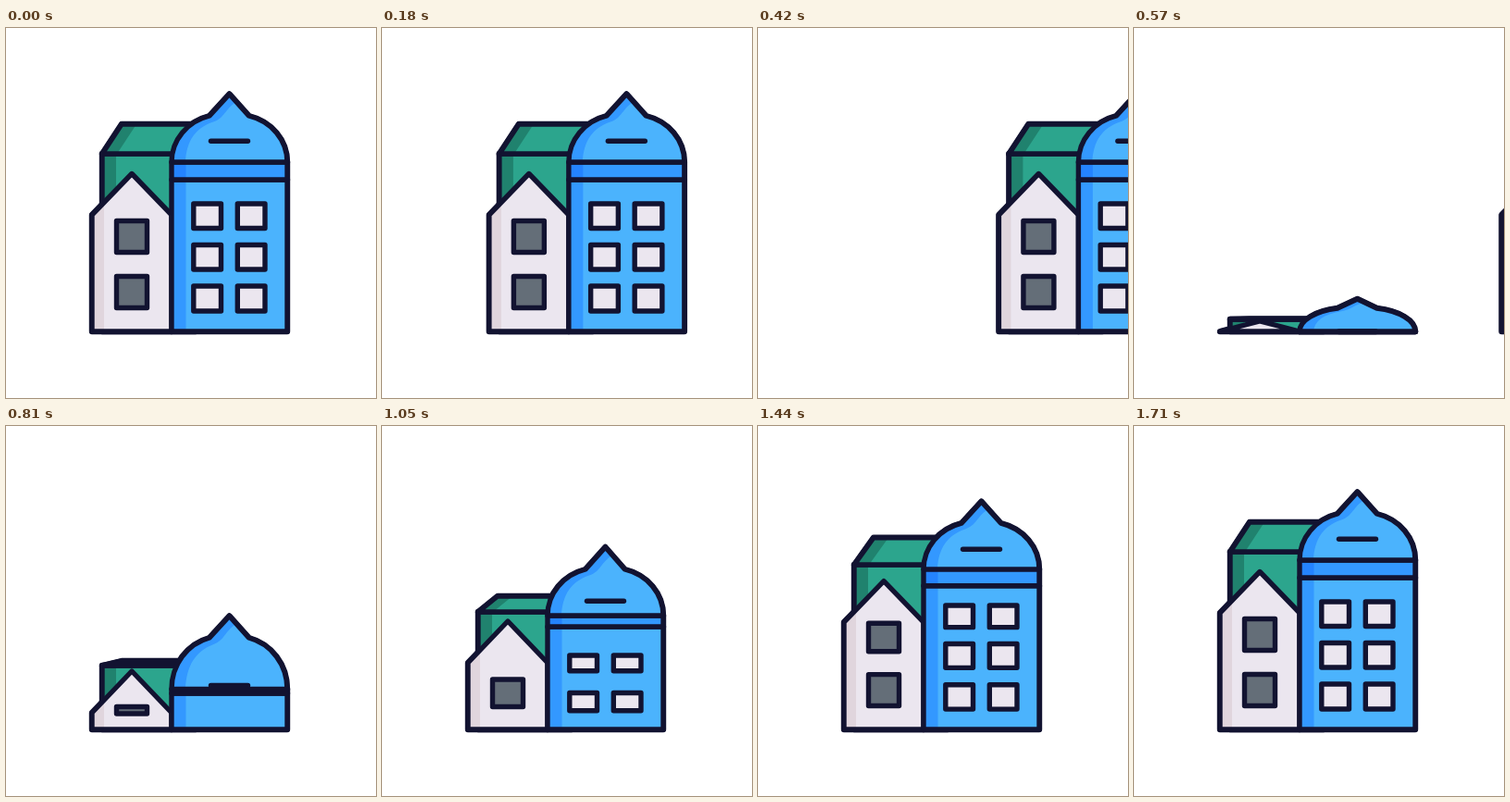
These frames come from a looping animation (400 px wide and 400 px high, 3.74 s). An HTML page with a canvas:

```html
<!DOCTYPE html>
<html lang="en">
<head>
<meta charset="utf-8">
<title>Houses</title>
<style>
  html, body { margin: 0; width: 100%; height: 100%; overflow: hidden; background: #fff; }
  canvas { display: block; width: 100vmin; height: 100vmin; }
</style>
</head>
<body>
<canvas id="stage"></canvas>
<script>
const LOOP = 3740, STEP = 30, GROUND = 328, RISE = 480, END = 1710;
const INK = '#121331', BLUE = '#4bb3fd', DEEP = '#3398ff', DEEPER = '#2483ff',
      GREEN = '#2ca58d', MOSS = '#20826e', PALE = '#ebe6ef', MAUVE = '#e0d5dd', GREY = '#646e78';
const RIM_LINE = 6.4, LINE = 5.4;

const canvas = document.getElementById('stage');
const ctx = canvas.getContext('2d');

// Monotone cubic curve through the keys, at rest on the last one.
function curve(times, values) {
  const n = times.length - 1;
  const sec = values.slice(1).map((v, i) => (v - values[i]) / (times[i + 1] - times[i]));
  const slope = values.map((v, i) => {
    if (i === 0) return sec[0];
    if (i === n) return 0;
    const a = sec[i - 1], b = sec[i];
    return a * b > 0 ? 2 * a * b / (a + b) : 0;
  });
  return t => {
    if (t <= times[0]) return values[0];
    if (t >= times[n]) return values[n];
    let i = 0;
    while (t >= times[i + 1]) i++;
    const d = times[i + 1] - times[i], u = (t - times[i]) / d, w = 1 - u;
    return w * w * (1 + 2 * u) * values[i] + u * u * (3 - 2 * u) * values[i + 1]
      + d * u * w * (w * slope[i] - u * slope[i + 1]);
  };
}

const rise = (...v) => curve([RISE, 570, 810, 1050, 1230, END], [GROUND, ...v]);

const slide = curve([0, 150, 300, 540, 570, 600, 690], [0, 16, 76, 278, 304.5, 331, 420]);

const pose = {
  tip: rise(293, 205.5, 131, 98, 71.5),
  shoulder: rise(303, 229, 155, 121.5, 95),
  rim: rise(328, 284.5, 205, 171, 145),
  band: rise(328, 289, 217, 187, 164),
  dash: rise(328, 280.4, 189.3, 151.3, 122.3),
  eave: rise(315, 259, 201, 171, 136),
  ridge: rise(314.5, 254, 184, 146, 104),
  apex: rise(316.8, 265, 211, 183.5, 157.5),
  wall: rise(328, 310, 256, 228, 202)
};

function pane(times, tops, bottoms) {
  return { from: times[0], top: curve(times, tops), bottom: curve(times, bottoms) };
}

const greyPanes = [
  pane([1110, 1230, END], [257, 222.5, 208.5], [257, 246, 242.5]),
  pane([765, 810, 1050, 1230, END], [314, 303.5, 274, 269, 268.5], [314, 311, 303.5, 302.5, 302.5])
];
const palePanes = [
  pane([1080, 1230, END], [227, 201.5, 190], [227, 219.8, 216.5]),
  pane([900, 1050, 1230, END], [272, 248, 237.5, 234.5], [272, 264.8, 262, 261]),
  pane([870, 1050, 1230, END], [311, 288.5, 281, 279], [311, 307.8, 306.3, 306])
];

function poly(...pts) {
  const p = new Path2D();
  for (let i = 0; i < pts.length; i += 2) p.lineTo(pts[i], pts[i + 1]);
  p.closePath();
  return p;
}

const box = (x1, y1, x2, y2) => poly(x1, y1, x2, y1, x2, y2, x1, y2);

function line(x1, y1, x2, y2) {
  ctx.beginPath();
  ctx.moveTo(x1, y1);
  ctx.lineTo(x2, y2);
  ctx.stroke();
}

// Filled shape with an optional shade clipped to it, then its outline.
function solid(path, color, shade, shadeColor) {
  ctx.fillStyle = color;
  ctx.fill(path);
  if (shade) {
    ctx.save();
    ctx.clip(path);
    ctx.fillStyle = shadeColor;
    ctx.fill(shade);
    ctx.restore();
  }
  ctx.stroke(path);
}

function panes(list, t, x1, x2, color) {
  for (const p of list) {
    if (t >= p.from) solid(box(x1, p.top(t), x2, p.bottom(t)), color);
  }
}

function greenHouse(y) {
  solid(box(104, y.eave, 205, GROUND), GREEN, box(104, y.eave, 119, GROUND), MOSS);
  solid(poly(104, y.eave, 125, y.ridge, 205, y.ridge, 205, y.eave), GREEN,
    poly(104, y.eave, 125, y.ridge, 141, y.ridge, 120, y.eave), MOSS);
}

function whiteHouse(y, t) {
  const front = poly(93, GROUND, 93, y.wall, 136, y.apex, 179, y.wall, 179, GROUND);
  solid(front, PALE, box(93, y.apex, 106, GROUND), MAUVE);
  panes(greyPanes, t, 119.5, 152.5, GREY);
}

function domePath(y) {
  const h = y.rim - y.shoulder;
  const p = new Path2D();
  p.moveTo(179, y.rim);
  p.bezierCurveTo(179, y.rim - h * .48, 196, y.rim - h * .88, 220, y.shoulder);
  p.lineTo(241.5, y.tip);
  p.lineTo(262.5, y.shoulder);
  p.bezierCurveTo(287, y.rim - h * .88, 304, y.rim - h * .48, 304, y.rim);
  p.closePath();
  return p;
}

function domeShade(y) {
  const h = y.rim - y.shoulder, k = y.shoulder - y.tip;
  const p = new Path2D();
  p.moveTo(179, y.rim);
  p.lineTo(179, y.tip);
  p.lineTo(241.5, y.tip);
  p.lineTo(249, y.tip + k * .36);
  p.bezierCurveTo(236, y.tip + k * .7, 237, y.shoulder + h * .04, 224, y.shoulder + h * .13);
  p.bezierCurveTo(205, y.shoulder + h * .26, 195, y.rim - h * .46, 194, y.rim);
  p.closePath();
  return p;
}

function tower(y, t) {
  solid(box(179, y.band, 304, GROUND), BLUE, box(179, y.band, 194.5, GROUND), DEEP);
  solid(box(179, y.rim, 304, y.band), DEEP, box(179, y.rim, 194.5, y.band), DEEPER);
  solid(domePath(y), BLUE, domeShade(y), DEEP);
  line(221.5, y.dash, 261.5, y.dash);
  panes(palePanes, t, 202.8, 232.5, PALE);
  panes(palePanes, t, 250.3, 280, PALE);
}

function houses(t, dx) {
  const y = {};
  for (const key in pose) y[key] = pose[key](t);
  ctx.save();
  ctx.translate(dx, 0);
  // The wider first pass only stays visible around the silhouette.
  for (const width of [RIM_LINE, LINE]) {
    ctx.lineWidth = width;
    greenHouse(y);
    whiteHouse(y, t);
    tower(y, t);
  }
  ctx.restore();
}

function draw(t) {
  const scale = canvas.width / 400;
  ctx.setTransform(scale, 0, 0, scale, 0, 0);
  ctx.fillStyle = '#fff';
  ctx.fillRect(0, 0, 400, 400);
  ctx.strokeStyle = INK;
  ctx.lineCap = ctx.lineJoin = 'round';
  if (t > RISE) houses(t, 0);
  if (t < 690) houses(END, slide(t));
}

function resize() {
  const side = Math.min(innerWidth, innerHeight) * (devicePixelRatio || 1);
  canvas.width = canvas.height = Math.max(1, Math.round(side));
}

const start = performance.now();
function tick() {
  const t = (performance.now() - start) % LOOP;
  draw(Math.floor(t / STEP) * STEP);
  requestAnimationFrame(tick);
}

addEventListener('resize', resize);
resize();
tick();
</script>
</body>
</html>
```
